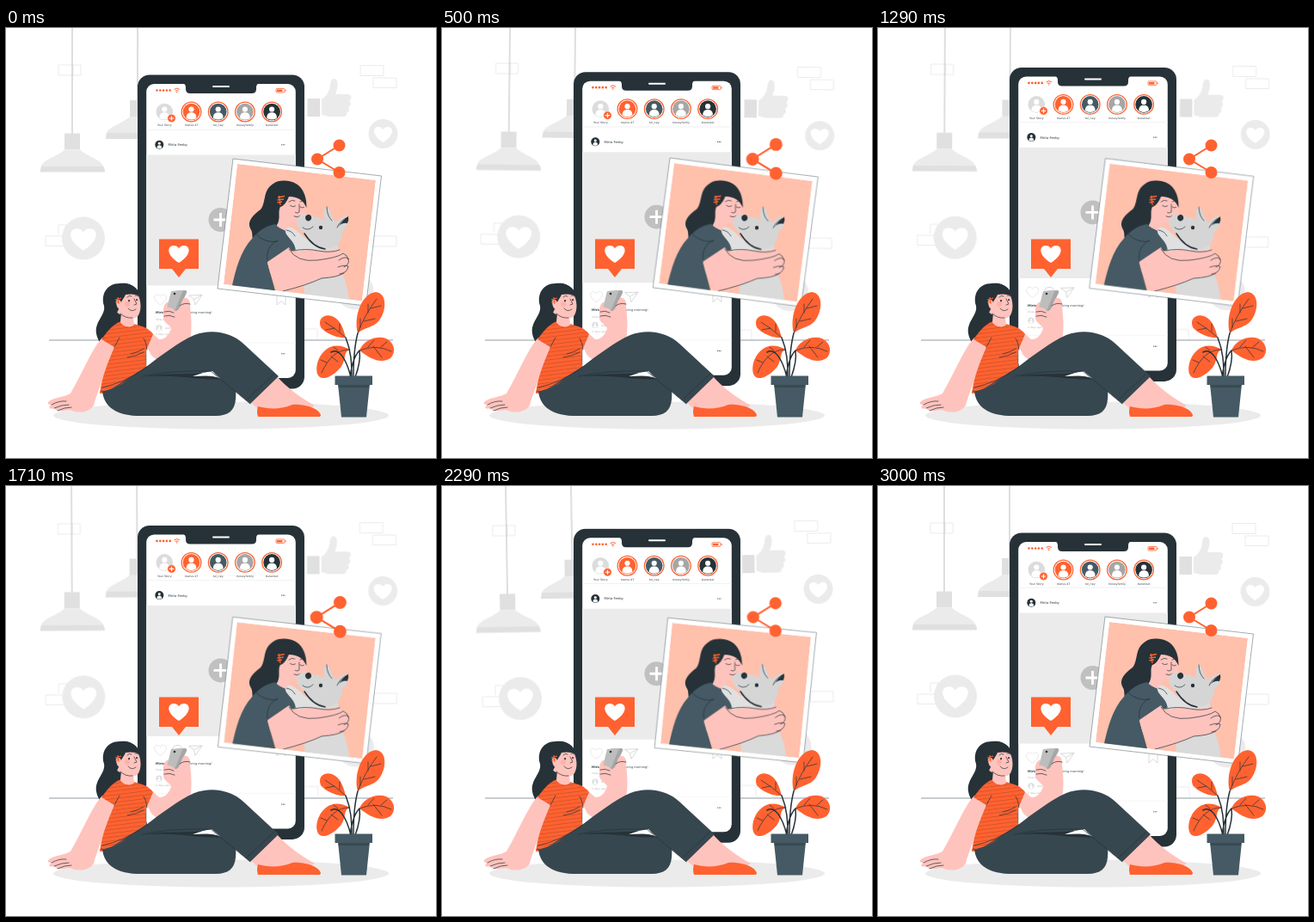
An HTML page that plays this animation: 500x500 px, repeating every 3.04 s.

```html
<!DOCTYPE html>
<html lang="en">
<head>
<meta charset="utf-8">
<title>Sharing a photo</title>
<style>
  html, body { margin: 0; width: 100%; height: 100%; overflow: hidden; background: #fff; }
  svg { display: block; width: 100vw; height: 100vh; }
  text { font-family: "DejaVu Sans", sans-serif; font-size: 3.6px; fill: #37474f; }
  .mid { text-anchor: middle; font-size: 3.3px; }
  .name { font-size: 3.8px; fill: #263238; }
  .faint { fill: #b5b5b5; font-size: 3px; }
  .ink { fill: none; stroke: #263238; stroke-width: .7; stroke-linecap: round; stroke-linejoin: round; }
  .thick { stroke-width: 1.5; }
  .icon { fill: none; stroke: #c9c9c9; stroke-width: .7; stroke-linejoin: round; }
  .brick { fill: none; stroke: #e6e6e6; stroke-width: .8; }
  .dark { fill: #263238; }
  .slate { fill: #37474f; }
  .steel { fill: #455a64; }
  .skin { fill: #ffc3bd; }
  .orange { fill: #ff6230; }
  .pale { fill: #ebebeb; }
  .grey { fill: #e0e0e0; }
  .white { fill: #fff; }

  /* 3 s of movement, then a short rest */
  .sway, .float, .beat { animation: 3040ms linear infinite; }
  .sway { animation-name: sway; }
  .float { animation-name: float; }
  .beat { animation-name: beat; transform-origin: 374.8px 152.3px; }
  .wall { transform-origin: 248px 181px; }
  .print { transform-origin: 341px 237px; }
  @keyframes sway {
    0%, 98.68%, 100% { transform: rotate(0deg); }
    24.67% { transform: rotate(1deg); }
    74.01% { transform: rotate(-1deg); }
  }
  @keyframes float {
    0%, 98.68%, 100% { transform: translateY(0); }
    49.34% { transform: translateY(-10px); }
  }
  @keyframes beat {
    0%, 29.6%, 49.34%, 78.95%, 100% { transform: scale(1); }
    9.87%, 59.2% { transform: scale(1.1); }
  }
</style>
</head>
<body>
<svg viewBox="0 0 500 500">
  <defs>
    <path id="heart" d="M0 10C-16 0-13-10-6-10C-3-10-1-8.500 0-6.500C1-8.500 3-10 6-10C13-10 16 0 0 10Z"/>
    <g id="person">
      <circle cy="-3" r="3.100"/>
      <path d="M-5.800 7.200C-6 2.500-3.500.8 0 .8S6 2.500 5.800 7.200Q0 11-5.800 7.200Z"/>
    </g>
    <g id="lamp">
      <path class="grey" d="M-9 0H9V19H-9Z"/>
      <path class="pale" d="M-9 19H9C17 27 33 30 36 38H-36C-33 30-17 27-9 19Z"/>
      <path class="grey" d="M-36 38H36Q38 41 38 45H-37Q-37 41-36 38Z"/>
    </g>
    <pattern id="stripes" width="20" height="4.400" patternUnits="userSpaceOnUse" patternTransform="rotate(-7)">
      <rect class="orange" width="20" height="4.400"/>
      <path d="M0 2.200H20" stroke="#b84c2b" stroke-width=".6"/>
    </pattern>
    <path id="sheet" d="M269 158L430 177L414 317.500L253 298Z"/>
    <clipPath id="crop"><use href="#sheet"/></clipPath>
  </defs>

  <g class="sway wall">
    <path class="brick" d="M61 43H87V55H61ZM78 43V55M412 43.500H439V55.500H412ZM427 58H454V69.500H427ZM61 240V229H78M66 242H46V253.500H68M427 242H454V254H427ZM340 350H362V362"/>
    <path d="M77 -12V123M153 -12V84" stroke="#c4c4c4" stroke-width="1.100"/>
    <use href="#lamp" x="77" y="122.500"/>
    <use href="#lamp" x="153" y="84"/>
    <path class="grey" d="M350.500 82H365V103H350.500Z"/>
    <path class="pale" d="M367 83C372 80 376 74 377 67C377 62 379 58.500 382 59C387 60 386 70 383 77H397C402 77 403 82 399 84.500C402 87 401 91 398 92C400 95 399 98 396 98.500C397 101.500 395 103 391 103H377C372 103 370 101 367 101Z"/>
    <circle class="pale" cx="90" cy="244.500" r="25"/>
    <use class="white" href="#heart" transform="translate(90 246) scale(1.270)"/>
    <circle class="pale" cx="438.500" cy="123" r="17"/>
    <use class="white" href="#heart" transform="translate(438.500 124) scale(.9)"/>
    <circle class="pale" cx="406" cy="306" r="21.500"/>
  </g>

  <path d="M50 363H450" stroke="#455a64" stroke-width=".6"/>
  <ellipse class="pale" cx="250" cy="450.500" rx="195" ry="16"/>

  <g class="float">
    <rect class="dark" x="153" y="54.500" width="194" height="365" rx="14"/>
    <rect class="white" x="163.200" y="65" width="173.600" height="342" rx="9"/>
    <path class="dark" d="M205 64H295Q291 65 291 69V71Q291 76 286 76H214Q209 76 209 71V69Q209 65 205 64Z"/>
    <rect class="white" x="240" y="67" width="20" height="2" rx="1"/>
    <path d="M175.500 72.500H192" fill="none" stroke="#ff6230" stroke-width="2.700" stroke-linecap="round" stroke-dasharray="0 3.800"/>
    <path d="M195.500 71.500Q198.700 68.800 202 71.500M197 73.200Q198.700 71.800 200.400 73.200" fill="none" stroke="#ff6230"/>
    <circle class="orange" cx="198.700" cy="74.500" r=".7"/>
    <rect x="314" y="70.500" width="10" height="4.500" rx="1" fill="none" stroke="#ff6230" stroke-width=".8"/>
    <path class="orange" d="M315 71.500H321.500V74H315ZM324.500 71.800H325.500V73.800H324.500Z"/>

    <g id="stories"></g>
    <circle class="orange" cx="192.500" cy="105" r="4.800" stroke="#fff" stroke-width=".6"/>
    <path d="M189.900 105H195.100M192.500 102.400V107.600" stroke="#fff" stroke-width="1.200"/>
    <path d="M163 118.300H337" stroke="#ebebeb" stroke-width=".7"/>

    <circle class="dark" cx="178.300" cy="135.700" r="5"/>
    <use class="white" href="#person" transform="translate(178.300 135.800) scale(.48)"/>
    <text class="name" x="188.500" y="137.200">Mirta Fenby</text>
    <path d="M320.700 135.700H324.500M320.700 378.700H324.500" stroke="#263238" stroke-width="1.100" stroke-linecap="round" stroke-dasharray="0 1.600"/>

    <path class="pale" d="M163.200 147.500H336.800V299.500H163.200Z"/>
    <circle cx="249.500" cy="223" r="14" fill="#c0c0c0"/>
    <path d="M241.500 223H257.500M249.500 215V231" stroke="#fff" stroke-width="2.800"/>

    <use class="icon" href="#heart" transform="translate(179.500 316) scale(.6)"/>
    <path class="icon" d="M199 310a6 6 0 1 0 4 10.500l3 1l-1-3a6 6 0 0 0-6-8.500ZM212.500 311L228 310.500L220 322L218.500 315.500ZM218.500 315.500L228 310.500M315 310.500H325V322L320 317.500L315 322Z"/>
    <text x="174" y="332.500"><tspan font-weight="700">Mirta</tspan> Such a lovely spring morning!</text>
    <text class="faint" x="174" y="340">View all comments</text>
    <circle cx="178" cy="348.800" r="3.600" fill="#dedede"/>
    <use class="white" href="#person" transform="translate(178 348.800) scale(.35)"/>
    <text class="faint" x="185" y="350">Add a comment</text>
    <text class="faint" x="174" y="357.500">2 days ago</text>
    <path d="M163 366H337" stroke="#f0f0f0" stroke-width=".6"/>
  </g>

  <g class="sway print">
    <path d="M264 152L436.500 172L418.500 323L246 303Z" fill="#fff" stroke="#455a64" stroke-width=".5"/>
    <g clip-path="url(#crop)">
      <use href="#sheet" fill="#ffc0ac"/>
      <path class="dark" d="M312 181C298 187 303 203 296 211C288 217 280 224 284 233C288 239 285 242 288 248L322 239L328 195Z"/>
      <path class="skin" d="M314 194H346C350 203 351 214 347 222C343 229 335 227 331 225V240C323 244 313 238 311 228Z"/>
      <path class="dark" d="M303 212C297 190 309 177 323 177.500C341 177 350 191 349.500 209C346 201 340 196 329 196C326 203 323 207 319 208C315 215 322 224 311 234L298 239Z"/>
      <path d="M316 197L324 195.500M315.500 200L323 199M315.500 203L321 202M317.500 195L319 206" fill="none" stroke="#ff6230" stroke-width="1.300"/>
      <path class="ink" d="M329 202Q333 199 336 201M342 202Q345 200 347 202M330.500 206.500Q333.500 209 336.500 207M342 208Q344.500 210 346.500 208.500M341 205V214Q339 216 336.500 214.500M335 219Q339 221 342 218.500"/>
      <path class="steel" d="M262 304C267 280 273 259 286 245C294 235 303 230 313 228C319 235 329 237 338 239L343 255L329 261L304 273L314 309Z"/>
      <path class="ink" d="M290 238C294 246 307 250 316 248M304 270C302 258 308 252 315 247"/>
      <path fill="#dadada" d="M350 242L384 242C387 252 387 262 387 275C393 289 398 302 399 318L347 312L345 270Z"/>
      <path class="grey" d="M325 234C330 228 338 235 345 242L366 260L352 267L337 259C336 246 323 242 325 234Z"/>
      <path fill="#d5d5d5" d="M338 224C341 215 349 215 355 219C362 219 367 222 371 224C367 217 370 209 373.500 207C378 212 378 221 384 226C389 220 394 218 398 219C399 227 396 232 391 237C391 247 385 255 376 256C363 258 353 250 348 240C342 235 337 230 338 224Z"/>
      <path class="dark" d="M348 220C350 215 356 217 355 222C353 226 348 225 348 220Z"/>
      <circle class="dark" cx="366" cy="232" r="2.200"/>
      <path class="ink thick" d="M347 239Q357 255 371 257"/>
      <path class="ink" d="M345 232Q351 237 357 231M373 208Q373 218 379 224M397.500 220Q388 224 385 232M326 235Q333 236 336 242"/>
      <path class="dark" d="M386 231C390 226 393 222 398 219Q399 223 397 227Q391 226 386 231Z"/>
      <path class="skin" d="M335 263C343 256 357 258 367 259C378 259 387 256 392 261L373 275L340 272Z"/>
      <path class="skin" d="M304 272L329 255C335 267 348 271 362 270C373 268 382 261 392 262C400 265 400 276 398 281C393 290 379 289 367 291C352 297 338 304 322 306C314 303 307 288 304 272Z"/>
      <path class="ink" d="M334 259Q349 256 363 259T388 258M329 257Q338 273 362 270T392 262Q397 264 398 269M387 270Q394 265 398 268Q400 275 393 278M386 278Q394 275 398 277Q397 285 388 286M322 306Q350 299 367 291Q385 290 393 285"/>
    </g>
  </g>

  <g class="beat" fill="none" stroke="#ff6230" stroke-linecap="round">
    <path d="M387.500 136.500L362 152.500L387.500 168" stroke-width="2"/>
    <path d="M387.500 136.500h0M362 152.500h0M387.500 168h0" stroke-width="14"/>
  </g>

  <g>
    <path class="orange" d="M409 355C404 336 413 309 430 307C443 308 443 328 434 340C427 349 416 348 409 355Z"/>
    <path class="orange" d="M395 360C387 361 372 356 366 348C362 338 370 332 379 335C389 339 392 349 395 360Z"/>
    <path class="orange" d="M400 374C391 376 397 389 386 398C377 407 365 411 362 402C359 390 366 376 377 371C385 368 393 370 400 374Z"/>
    <path class="orange" d="M411 375C415 364 430 357 442 361C452 366 454 377 447 384C436 391 424 385 411 375Z"/>
    <path class="ink thick" d="M402 406C402 388 401 375 395 360M404 406C404 385 405 370 409 355M400 406C402 391 405 381 411 375M406 406C412 390 412 382 411 375M401 406C395 382 386 372 378 377"/>
    <path class="ink" d="M409 355Q416 335 431 315M412 348L412 338M416 341L429 338M421 331L421 321M424 326L436 323M395 360Q384 350 371 342M388 353L388 344M382 349L372 351M400 374Q379 373 367 401M386 375L381 371M378 382L386 388M373 389L366 386M411 375Q430 367 448 376M421 371L428 363M427 370L437 383M436 371L443 365"/>
    <path class="steel" d="M386 414H423L419 452.500H390Z"/>
    <path class="dark" d="M386 414.500H422.500L422 418H386.500Z" opacity=".4"/>
    <rect class="steel" x="382.500" y="404.500" width="43.500" height="10.500"/>
  </g>

  <path class="orange" d="M178 245.500H224V280H209L201 290L193 280H178Z"/>
  <use class="white" href="#heart" x="201" y="263"/>

  <g>
    <path class="dark" d="M132 297C117 297 110 310 114 323C116 334 103 341 105 355C106 363 111 367 113 370L133 349L147 337L152 304C146 297 139 296 132 297Z"/>
    <path class="skin" d="M158 358L168 379C176 391 194 392 211 371C217 360 216 340 214 324L208 315L187 319C181 323 184 331 183 337C183 342 190 345 192 349C190 357 184 363 178 362L163 348Z"/>
    <path class="skin" d="M112 360C101 371 90 399 75 425C68 429 58 429 50 434C47 437 50 438 53 438C48 441 51 444 56 442C58 447 67 445 74 444C83 448 96 448 102 439C106 423 118 396 128 371Z"/>
    <path class="ink" d="M53 438Q62 433 70 434M56 442Q65 438 73 438M60 445Q68 441 76 441"/>
    <path fill="url(#stripes)" d="M135 341C127 342 119 351 111 362L126 371C119 388 112 403 109 425C129 425 147 412 164 397C162 389 163 382 163 375L171 356C167 350 158 346 148 344Z"/>
    <path class="ink" d="M126 371L132 360M164 374Q163 365 160 361M141 383Q151 382 160 377M145 379Q154 377 160 373"/>
    <path class="skin" d="M134 331L133 342C136 348 146 349 149 345L148 335Z"/>
    <path class="skin" d="M128 311C136 304 148 303 153 309C157 317 158 327 154 334C150 340 140 338 134 333C126 333 124 317 128 311Z"/>
    <path class="dark" d="M122 303C132 294 153 295 156 312C150 309 144 309 139 310C137 315 133 318 132 325L128 333L119 330Z"/>
    <path class="skin" d="M128 317Q133 314 134 320L135 328Q128 328 128 317Z"/>
    <path d="M127 316L134 314M127 319L132 318M130 313L131 321" stroke="#ff6230" stroke-width="1.200"/>
    <path class="ink" d="M141 313Q143 310 146 312M150 311Q152 310 154 312M149 315L152 321L149 322M142 326Q146 331 151 327M133 332Q139 338 147 337"/>
    <path class="dark" d="M143 316a1 1.200 0 1 0 .1 0M152 315a.9 1.100 0 1 0 .1 0"/>
    <circle cx="141" cy="321" r="3" fill="#ff9c91" opacity=".45"/>

    <path d="M194 306L208 305Q211 305 210 308L201 327Q200 329 198 329L187 330Z" fill="#a6a6a6"/>
    <path d="M192 306L206 305L196 329L186 330Z" fill="#bdbdbd"/>
    <circle class="dark" cx="196" cy="309" r="1.300"/>
    <path class="skin" d="M183 326C188 323 195 326 197 330C205 326 202 319 207 314C212 313 215 318 214 325V338L195 347L184 339Z"/>
    <path class="ink" d="M184 330Q190 328 195 331M184 335Q190 333 196 336M202 323Q207 319 214 321"/>

    <path class="slate" d="M109 423C126 421 145 409 165 393L252 404C264 406 269 419 267 432C266 445 258 451 244 451H152C125 450 113 438 112 421Z"/>
    <path class="dark" d="M165 405C187 398 215 405 238 399L253 408C231 411 197 402 165 405Z"/>
    <path class="white" d="M217 405L238 398L250 408C240 403 229 405 217 405Z"/>
    <path class="skin" d="M283 434L315 405C326 418 343 430 359 439C351 446 311 447 294 444Z"/>
    <path class="orange" d="M293 440C307 444 321 443 333 438C344 437 363 441 366 450Q366 452 363 452H293Q291 446 293 440Z"/>
    <path class="slate" d="M163 394C180 381 201 365 219 357C241 349 263 355 276 367L317 405L284 437C266 422 252 410 240 399C218 404 184 401 159 405C148 406 132 415 122 420Z"/>
    <path class="ink" d="M159 405Q188 398 238 399Q256 414 284 437M281 431L311 403M112 418Q137 413 164 394"/>
  </g>
</svg>
<script>
  const stories = [
    ['Your Story', '#dcdcdc'],
    ['marvo.47', '#ff6230'],
    ['tol_ney', '#455a64'],
    ['mossyfernly', '#a6a6a6'],
    ['bunwisel', '#263238']
  ];
  document.getElementById('stories').innerHTML = stories.map(([label, color], i) => {
    const x = 184.3 + i * 31.2;
    const ring = i ? `<circle cx="${x}" cy="97.500" r="11.300" fill="#fff" stroke="#ff6230" stroke-width="1.300"/>` : '';
    return `${ring}<circle cx="${x}" cy="97.500" r="9.800" fill="${color}"/>
      <use class="white" href="#person" x="${x}" y="97.500"/>
      <text class="mid" x="${x}" y="114.500">${label}</text>`;
  }).join('');
</script>
</body>
</html>
```
